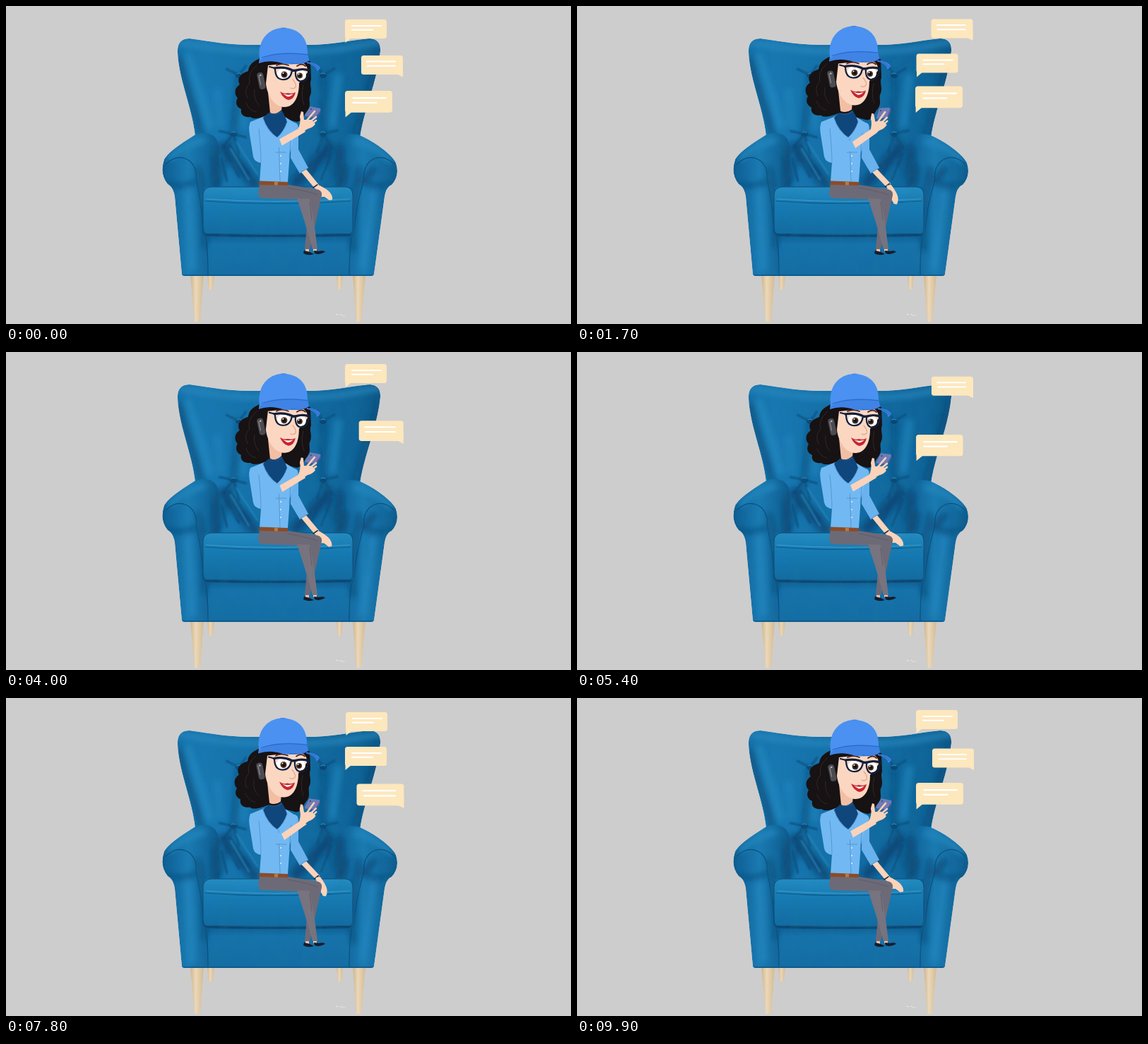
An HTML page for the animation above (10 s loop, 800x450 px).

```html
<!DOCTYPE html>
<html lang="en">
<head>
<meta charset="utf-8">
<title>Chat in the armchair</title>
<style>
html, body { margin: 0; width: 100%; height: 100%; overflow: hidden; background: #cdcdcd; }
svg { display: block; width: 100vw; height: 100vh; }
.line { fill: none; stroke-linecap: round; stroke-linejoin: round; }
</style>
</head>
<body>
<svg viewBox="0 0 800 450">
<defs>
  <linearGradient id="backFill" x2="1" y2="0">
    <stop offset="0" stop-color="#1470a8"/><stop offset=".12" stop-color="#1978b3"/>
    <stop offset=".55" stop-color="#136ca4"/><stop offset=".88" stop-color="#0f6398"/><stop offset="1" stop-color="#0d5585"/>
  </linearGradient>
  <linearGradient id="armFill" x2="1" y2="0">
    <stop offset="0" stop-color="#0d5b91"/><stop offset=".45" stop-color="#1b7bb4"/><stop offset="1" stop-color="#0e5a8e"/>
  </linearGradient>
  <linearGradient id="seatFill" x2="0" y2="1">
    <stop offset="0" stop-color="#258dc3"/><stop offset=".25" stop-color="#1b80b9"/><stop offset=".4" stop-color="#167ab3"/><stop offset="1" stop-color="#126a9f"/>
  </linearGradient>
  <linearGradient id="baseFill" x2="0" y2="1">
    <stop offset="0" stop-color="#0d5587"/><stop offset=".3" stop-color="#1672ab"/><stop offset="1" stop-color="#146ca3"/>
  </linearGradient>
  <linearGradient id="wood" x2="1" y2="0">
    <stop offset="0" stop-color="#d0b48e"/><stop offset=".4" stop-color="#ead8b9"/><stop offset="1" stop-color="#d5ba93"/>
  </linearGradient>
  <filter id="soft" x="-40%" y="-40%" width="180%" height="180%"><feGaussianBlur stdDeviation="4"/></filter>
  <filter id="fine" x="-40%" y="-40%" width="180%" height="180%"><feGaussianBlur stdDeviation="1.2"/></filter>
  <filter id="velvet" x="0" y="0" width="100%" height="100%">
    <feTurbulence type="fractalNoise" baseFrequency=".06 .035" numOctaves="3" seed="4"/>
    <feColorMatrix values="0 0 0 0 .01  0 0 0 0 .2  0 0 0 0 .34  .9 0 0 0 -.3"/>
  </filter>
  <path id="back" d="M243 66Q242 46 260 46C294 51 318 55 345 55H430C460 55 490 48 515 46Q531 47 530 64C525 110 506 148 501 187L495 270H280L268 185C264 145 245 105 243 66Z"/>
  <path id="leftArm" d="M268 182C252 192 230 206 224 217Q217 238 229 252Q237 256 239 270L249 380Q250 382 253 382H287L285 326Q278 320 280 256L302 256V204Q301 185 288 181Q277 178 268 182Z"/>
  <path id="rightArm" d="M501 183C518 190 546 209 552 222Q558 240 546 253Q538 256 536 270L521 380Q520 382 517 382H484L487 326Q492 320 491 256L467 256V204Q470 186 483 182Q492 180 501 183Z"/>
  <clipPath id="chairClip"><use href="#back"/><use href="#leftArm"/><use href="#rightArm"/><path d="M278 255H493V382H278Z"/></clipPath>
  <clipPath id="backClip"><use href="#back"/></clipPath>
</defs>

<rect width="800" height="450" fill="#cdcdcd"/>

<g fill="url(#wood)">
  <path d="M285 380H295L293 401H287Z"/><path d="M468 380H477L475 401H470Z"/>
  <path d="M261 380H280L275 447H267Z"/><path d="M491 380H509L503 447H496Z"/>
</g>
<path class="line" d="M467 436L470 437M473 436L476 438M478 438L479 438" stroke="#eee" stroke-width="1"/>

<g clip-path="url(#chairClip)">
  <use href="#back" fill="url(#backFill)"/>
  <g clip-path="url(#backClip)" class="line">
    <g filter="url(#soft)">
      <path d="M243 52C285 58 320 64 345 64H430C470 64 500 55 530 51" stroke="#2a8ac1" stroke-width="6"/>
      <path d="M246 75C251 110 270 145 278 190M526 75C519 115 500 145 494 190" stroke="#0c4e7c" stroke-width="7"/>
      <path d="M258 70C268 105 280 135 288 170" stroke="#2487c0" stroke-width="9"/>
      <path d="M330 98L322 181L300 250M449 98L449 181L466 240" stroke="#0d5384" stroke-width="7"/>
      <path d="M342 108L336 170M300 120L303 168M470 100L462 168" stroke="#1f80b9" stroke-width="10"/>
      <path d="M308 200L352 252M410 250L458 200" stroke="#0c4c7b" stroke-width="16"/>
    </g>
    <g filter="url(#fine)" stroke="#0b4a78" stroke-width="2">
      <path d="M330 98L312 89M330 98L340 84M330 98L333 116M322 181L302 177M322 181L330 210M322 181L307 200M322 181L340 186M449 181L470 176M449 181L440 208M449 181L463 202M449 98L466 88M449 98L440 84"/>
      <path d="M316 196L346 240M311 206L330 242M305 216L313 248M456 196L432 240M461 208L446 246"/>
    </g>
    <path d="M326 192L356 238M318 202L344 246" stroke="#2b8ac0" stroke-width="1.5" filter="url(#fine)"/>
  </g>
  <g fill="#0b4774"><ellipse cx="330" cy="98" rx="5" ry="4"/><ellipse cx="322" cy="181" rx="5" ry="4"/><ellipse cx="449" cy="181" rx="5" ry="4"/><ellipse cx="449" cy="98" rx="5" ry="4"/></g>
  <g class="line" stroke="#2783b8" stroke-width="1.5"><path d="M327 96Q330 94 333 96M319 179Q322 177 325 179M446 179Q449 177 452 179M446 96Q449 94 452 96"/></g>

  <path d="M278 318H493V382H278Z" fill="url(#baseFill)"/>
  <use href="#leftArm" fill="url(#armFill)"/><use href="#rightArm" fill="url(#armFill)"/>
  <g class="line" filter="url(#soft)">
    <path d="M232 215C250 199 266 193 279 190M544 218C525 201 511 195 495 192" stroke="#2486bd" stroke-width="9"/>
    <path d="M297 204V254M473 202V254" stroke="#0b4b79" stroke-width="10"/>
    <path d="M273 230Q283 280 281 340M500 230Q490 285 491 345" stroke="#0b4d7c" stroke-width="7"/>
    <path d="M258 264L264 370M520 264L506 370" stroke="#2384bd" stroke-width="9"/>
    <path d="M227 250Q247 259 269 248M546 250Q526 260 507 249" stroke="#0b4c7b" stroke-width="5"/>
    <path d="M481 230L476 252M520 231L507 249" stroke="#0a4571" stroke-width="7"/>
  </g>
  <g class="line" stroke="#0c4e7d" stroke-width="1.2">
    <path d="M226 224Q244 207 261 220Q271 230 269 245Q279 290 279 320Q286 326 286 381M550 224Q532 207 515 220Q505 230 507 245Q494 290 493 320Q486 326 486 381"/>
  </g>

  <path d="M279 268Q279 257 290 256H481Q491 257 491 268V314Q491 325 480 325H292Q279 325 279 314Z" fill="url(#seatFill)" stroke="#0b4a78"/>
  <g class="line">
    <path d="M282 276Q380 283 488 276" stroke="#0d5688" stroke-width="1.2"/>
    <path d="M283 273Q380 280 487 273" stroke="#41a0cf" stroke-width="1"/>
    <path d="M284 323Q380 328 487 323" stroke="#083e66" stroke-width="3" filter="url(#fine)"/>
  </g>
  <rect x="220" y="40" width="340" height="345" filter="url(#velvet)" opacity=".45"/>
  <path class="line" d="M250 381H520" stroke="#0c5487" stroke-width="1.5"/>
</g>

<g id="woman">
  <g id="farHand" fill="#fbd3ba">
    <path d="M418 235L425 231L443 253L437 258Z"/>
    <path class="line" d="M435 257L441 253" stroke="#272b3b" stroke-width="1.8"/>
    <path id="fingers" d="M437 257L442 253Q453 258 458 263Q463 269 462 274L458 275L451 270L446 270Q443 263 437 257Z"/>
  </g>
  <g id="head">
    <path fill="#171213" d="M365 72C350 77 344 83 343 92C330 96 327 104 331 111C322 117 324 126 328 130C323 139 329 144 333 146C331 155 339 158 346 157C353 162 364 157 372 154L412 164C422 162 421 154 426 149C434 140 427 133 431 126C434 118 429 111 432 104L431 78Z"/>
    <path class="line" d="M355 84Q341 96 345 109Q336 118 342 130M352 118Q350 132 358 140M340 137Q344 148 354 150M421 112Q417 128 422 140" stroke="#332827" stroke-width="1"/>
    <path fill="#f3bfa4" d="M371 122L374 151Q382 155 390 149L391 138Z"/>
    <path fill="#fbd7c2" d="M371 84L416 79Q428 82 427 94L415 109C415 127 409 143 394 143C379 142 370 126 368 110Z"/>
    <path class="line" d="M406 104Q412 111 410 115Q407 118 403 116" stroke="#dfa58a" stroke-width="1.2"/>
    <path fill="#c9252f" d="M388 121Q394 125 399 123Q405 125 410 122Q408 132 400 133Q392 131 388 121Z"/>
    <path fill="#fff" d="M392 124Q399 127 407 124.500Q402 129 398 128Z"/>
    <ellipse cx="393" cy="96" rx="9" ry="7.500" fill="#fff"/><ellipse cx="418" cy="98" rx="7" ry="7" fill="#fff"/>
    <g fill="#503020"><circle cx="394" cy="97" r="4.500"/><circle cx="416" cy="98.500" r="4"/></g>
    <g fill="#111"><circle cx="394" cy="97" r="2.500"/><circle cx="416" cy="98.500" r="2.300"/></g>
    <g fill="#fff"><circle cx="392.500" cy="95" r="1"/><circle cx="414.500" cy="96.500" r="1"/></g>
    <g class="line" stroke="#101f3d" stroke-width="2.200">
      <path d="M373 86L381 88Q381 103 391 104Q403 105 405 91Q394 86 381 88M405 92L410 92Q409 106 419 107Q428 105 429 92Q420 88 410 92"/>
      <path d="M380 88Q394 85 406 91L410 91Q420 88 430 91" stroke-width="3"/>
    </g>
    <path class="line" d="M383 84Q391 80 400 84M412 85Q419 80 424 85" stroke="#512319" stroke-width="1.800"/>
    <g transform="rotate(-12 361 106)"><rect x="357" y="94" width="9" height="24" rx="4" fill="#4c4b50"/><path class="line" d="M359.500 98V111" stroke="#99979b"/><circle cx="362" cy="98" r="1.300" fill="#bbb"/></g>
    <path fill="#4a91f2" d="M359 74C356 50 370 31 393 31C417 32 428 47 427 69L429 77Q421 84 393 81Q374 74 358 81Z"/>
    <path fill="#3f83e5" d="M358 81Q362 70 383 67Q410 65 427 68L429 76Q421 84 394 82Q375 75 358 81Z"/>
    <path class="line" d="M362 73Q390 64 427 69" stroke="#235fb8" stroke-width=".9" stroke-dasharray="2 1"/>
    <path fill="#3c7fe0" d="M426 79Q442 81 445 87Q444 91 440 92Q441 85 426 81Z"/>
    <path class="line" d="M404 81Q422 84 429 77M429 81Q440 83 443 89" stroke="#2766be" stroke-width=".8"/>
    <ellipse cx="393" cy="31.500" rx="4" ry="1" fill="#4388ea"/>
  </g>
  <path fill="#69b2ee" d="M404 165Q413 163 414 172L414 203L428 229L416 237L403 215Z"/>
  <path fill="#72b9f3" d="M371 154L346 164Q343 170 345 182L350 213Q352 221 361 222L359 249H399L402 207L413 168L392 155Z"/>
  <path fill="#0f467b" d="M372 151Q382 155 390 147L395 156L398 164Q393 178 384 186Q370 176 364 158Z"/>
  <path class="line" d="M374 152Q382 155 390 150" stroke="#2c6398" stroke-width=".8"/>
  <path class="line" d="M364 159Q370 178 384 186Q394 177 398 164M386 187L388 248M358 174Q361 202 361 221M382 207H397M404 180L401 214M416 236L428 229" stroke="#4d8ec8" stroke-width=".8"/>
  <g fill="#e4f2fd"><circle cx="389" cy="212" r="1"/><circle cx="389" cy="223" r="1"/><circle cx="389" cy="234" r="1"/></g>
  <path fill="#6d6a77" d="M359 253H399L438 259Q448 260 447 268L430 344H423L427 300L420 274L365 272Q357 272 357 264Z"/>
  <path fill="#77737f" d="M412 272L430 273L436 305L441 344H434L423 306Z"/>
  <path class="line" d="M399 257Q430 263 441 267M430 277L433 302" stroke="#5c5966" stroke-width=".8"/>
  <path fill="#8c4b27" d="M359 247.500L399 249V254L358 253Z"/><rect x="380" y="248.500" width="5" height="5" fill="#b77b42"/>
  <path fill="#efc0a6" d="M424 344H429V348H424ZM435 344H440V347H435Z"/>
  <path fill="#171c2b" d="M422 346L430 348L436 351Q428 354 421 350ZM436 346L443 347Q450 345 452 348Q443 353 437 350Z"/>

  <g id="nearArm">
    <path fill="#fbd3ba" d="M386 189L413 174L419 171L424 178L390 198Q385 199 386 189Z"/>
    <path fill="#72b9f3" d="M379 185L387 188L391 198L382 202Z"/>
    <g id="phoneHand">
      <path fill="#fbd3ba" d="M413 175Q418 165 416 156L418 149L421 150L422 161L433 161L438 167Q435 172 427 174L419 179Z"/>
      <g id="phone"><path fill="#6f7bb5" d="M431 142L445 145Q446 147 445 149L438 158L424 156Q423 155 424 153Z"/><path fill="#4e5a94" d="M424 156L438 158L445 148L446 150L439 160L425 158Z"/><circle cx="432" cy="146" r="1" fill="#39416d"/></g>
      <path class="line" d="M425 163L437 149M429 165L439 157M431 168L439 162" stroke="#fbd3ba" stroke-width="2.600"/>
    </g>
  </g>
</g>
<g id="bubbles"></g>
</svg>
<script>
const NS = "http://www.w3.org/2000/svg";
const CYCLE = 5000, LEAD = 100;
const WIDE = 1.135;
const byId = id => document.getElementById(id);
const clamp = v => Math.max(0, Math.min(1, v));
const ramp = (t, start, length) => clamp((t - start) / length);
const smooth = v => v * v * (3 - 2 * v);
const mix = (a, b, v) => a + (b - a) * v;

const slot = (side, x, y, scale = 1) => ({ side, x, y, scale });
const layouts = [
  [slot("L", 480, 17), slot("R", 503, 71.5), slot("L", 480, 120, WIDE)],
  [slot("R", 501.500, 18.500), slot("L", 480.500, 67.500), slot("L", 479, 113.500, WIDE)],
  [slot("L", 481, 20), slot("L", 480, 69), slot("R", 496.500, 121.500, WIDE)]
];
const stepStarts = [0, 2000, 3450];

const shapes = {
  L: { tail: "M0.500 18V33L9 26Z", text: "M10 9H51M10 14.800H39" },
  R: { tail: "M59 18V30.500L50 26Z", text: "M8 8.500H48M9 14.800H48" }
};

function makeBubble() {
  const group = document.createElementNS(NS, "g");
  group.innerHTML = `<rect width="59" height="27" rx="3.500" fill="#fde7bd"/><path fill="#fde7bd"/>
    <path class="line" stroke="#fff" stroke-width="2"/>`;
  byId("bubbles").append(group);
  const [, tail, text] = group.children;
  return ({ side, x, y, scale }, opacity = 1) => {
    tail.setAttribute("d", shapes[side].tail);
    text.setAttribute("d", shapes[side].text);
    group.setAttribute("transform", `translate(${x} ${y}) scale(${scale})`);
    group.setAttribute("opacity", opacity);
  };
}
const [leaving, upper, middle, entering] = Array.from({ length: 4 }, makeBubble);

const between = (a, b, v) => slot(a.side, mix(a.x, b.x, v), mix(a.y, b.y, v), mix(a.scale, b.scale, v));

function popIn(s, v) {
  const shift = s.scale * (1 - v);
  return slot(s.side, s.x + 29.500 * shift, s.y + 13.500 * shift, s.scale * v);
}

// Messages move up one slot, the highest first.
function drawBubbles(t) {
  const phase = (t + LEAD) % CYCLE;
  const step = stepStarts.findLastIndex(start => start <= phase);
  const u = phase - stepStarts[step];
  const from = layouts[step], to = layouts[(step + 1) % 3];
  leaving({ ...from[0], y: from[0].y + 2 * ramp(u, 0, 100) }, 1 - ramp(u, 100, 250));
  upper(between(from[1], to[0], ramp(u, 0, 600) ** 2));
  middle(between(from[2], to[1], ramp(u, 420, 330) ** 2));
  const shown = ramp(u, 680, 200);
  entering(popIn(to[2], shown), shown ? 1 : 0);
}

function drawWoman(t) {
  const pose = smooth(ramp(t, 400, 1000)) - smooth(ramp(t, 2900, 1400));
  const tilt = Math.max(0, Math.sin(Math.PI * t / 2500));
  const set = (id, value) => byId(id).setAttribute("transform", value);
  set("head", `translate(${-pose} ${-2.500 * pose})`);
  set("nearArm", `rotate(${-5 * pose} 432 160)`);
  set("phoneHand", `translate(0 ${1.800 * tilt})`);
  set("phone", `rotate(${-12 * tilt} 434 151)`);
  set("farHand", `rotate(${-4 * pose} 421 233)`);
  set("fingers", `rotate(${32 * pose} 440 256)`);
}

function render(time) {
  const t = Math.floor(time / 100) * 100 % CYCLE;
  drawBubbles(t);
  drawWoman(t);
}

const begin = performance.now();
function tick() {
  render(performance.now() - begin);
  requestAnimationFrame(tick);
}
tick();
</script>
</body>
</html>
```
